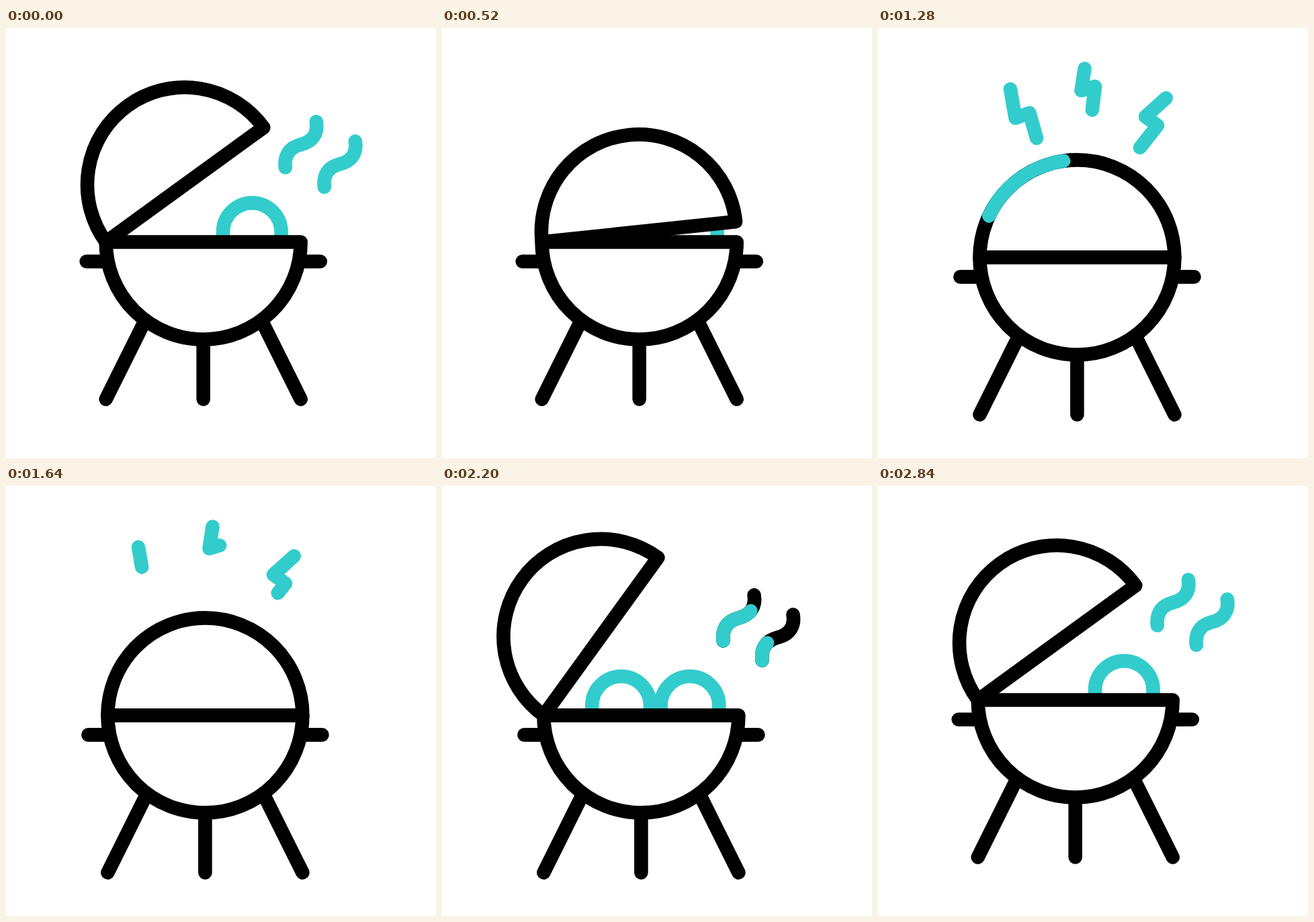
An HTML page for the animation above (3000 ms loop, 640 by 640 pixels).

```html
<!DOCTYPE html>
<html lang="en">
<head>
<meta charset="utf-8">
<title>Barbecue</title>
<style>
  html, body { margin: 0; width: 100%; height: 100%; overflow: hidden; background: #fff; }
  svg { display: block; width: 100%; height: 100%; }
  path, circle { fill: none; stroke: #000; stroke-width: 20.6; stroke-linecap: round; stroke-linejoin: round; }
  .solid { fill: #fff; }
  .accent { stroke: #3cc; }
</style>
</head>
<body>
<svg viewBox="0 0 640 640">
  <defs>
    <path id="wave"/>
  </defs>
  <g id="grill">
    <g id="steam"></g>
    <path id="foodLeft" class="accent" pathLength="1" d="M220.6 319V303.7a43.3 43.3 0 0 1 86.6 0V319"/>
    <path class="accent" d="M323 319V303.7a43.3 43.3 0 0 1 86.6 0V319"/>
    <path id="lid" class="solid" d="M148.7 318.5a145 145 0 0 1 290 0z"/>
    <path d="M119.7 347.5H149M438 347.5H467.8M148.7 552.5L206.2 437M293.7 463V552.5M438.7 552.5L381.2 437"/>
    <path class="solid" d="M148.7 318.5a145 145 0 0 0 290 0z"/>
    <circle id="sweep" class="accent" cx="293.7" cy="318.5" r="145" pathLength="360"/>
  </g>
  <g id="bolts"></g>
</svg>
<script>
const LOOP = 3000;
const $ = id => document.getElementById(id);

// Smooth 0..1 progress between two times.
const ease = (t, from, to) => {
  const u = Math.min(1, Math.max(0, (t - from) / (to - from)));
  return u * u * (3 - 2 * u);
};

// Show only the part of a path between a and b.
function trim(el, a, b, total = 1) {
  const shown = b - a > total * 0.001;
  el.style.display = shown ? '' : 'none';
  if (!shown) return;
  if (b - a >= total) {
    el.removeAttribute('stroke-dasharray');
    return;
  }
  el.setAttribute('stroke-dasharray', `${b - a} ${total * 3}`);
  el.setAttribute('stroke-dashoffset', -a);
}

function addPath(parent, d, cls) {
  const el = document.createElementNS('http://www.w3.org/2000/svg', 'path');
  el.setAttribute('d', d);
  el.setAttribute('pathLength', 1);
  el.setAttribute('class', cls);
  return parent.appendChild(el);
}

const wave = 'c-2-17 5-29.5 23-34s26-17 23-34';
const steam = [
  { at: '415.8 207.5', out: 80, ink: 1840, tint: 2017 },
  { at: '473.8 236.6', out: 160, ink: 1920, tint: 2098 }
].map(s => ({
  ...s,
  base: addPath($('steam'), `M${s.at}${wave}`, ''),
  top: addPath($('steam'), `M${s.at}${wave}`, 'accent')
}));

const bolts = [
  { d: 'M236 164L225.5 126.5L204.5 134L197 91', grow: 676, out: 1460 },
  { d: 'M318.8 122L323 87L302.5 93L307.5 60.5', grow: 724, out: 1510 },
  { d: 'M390 178L416 145L398 132L428.7 104.3', grow: 819, out: 1555 }
].map(b => ({ ...b, el: addPath($('bolts'), b.d, 'accent') }));

function draw(t) {
  const back = ease(t, 2240, 2840);
  const drop = ease(t, 540, 800) - back;
  $('grill').setAttribute('transform', `translate(${2.7 * drop} ${22.9 * drop})`);

  const angle = t < 1200
    ? 36 * (1 - ease(t, 80, 675))
    : 54.1 * ease(t, 1657, 2020) - 18.1 * back;
  $('lid').setAttribute('transform', `rotate(${-angle} 148.7 318.5)`);

  const hidden = t < 1200 ? 1 : ease(t, 2280, 2640);
  trim($('foodLeft'), hidden, 1);

  const head = -50 + 402 * ease(t, 672, 1152);
  const tail = -50 + 360 * ease(t, 842, 1342) + 42 * ease(t, 1280, 1420);
  trim($('sweep'), 0, head - tail, 360);
  $('sweep').setAttribute('transform', `rotate(${tail - 90} 293.7 318.5)`);

  for (const s of steam) {
    if (t < 1200) {
      trim(s.base, 0, 0);
      trim(s.top, ease(t, s.out, s.out + 290), 1);
    } else {
      const tint = ease(t, s.tint, s.tint + 280);
      trim(s.base, 0, tint < 1 ? ease(t, s.ink, s.ink + 280) : 0);
      trim(s.top, 0, tint);
    }
  }

  for (const b of bolts) {
    trim(b.el, ease(t, b.out, b.out + 280), ease(t, b.grow, b.grow + 280));
  }
}

$('wave').remove();
function tick() {
  draw(performance.now() % LOOP);
  requestAnimationFrame(tick);
}
tick();
</script>
</body>
</html>
```
